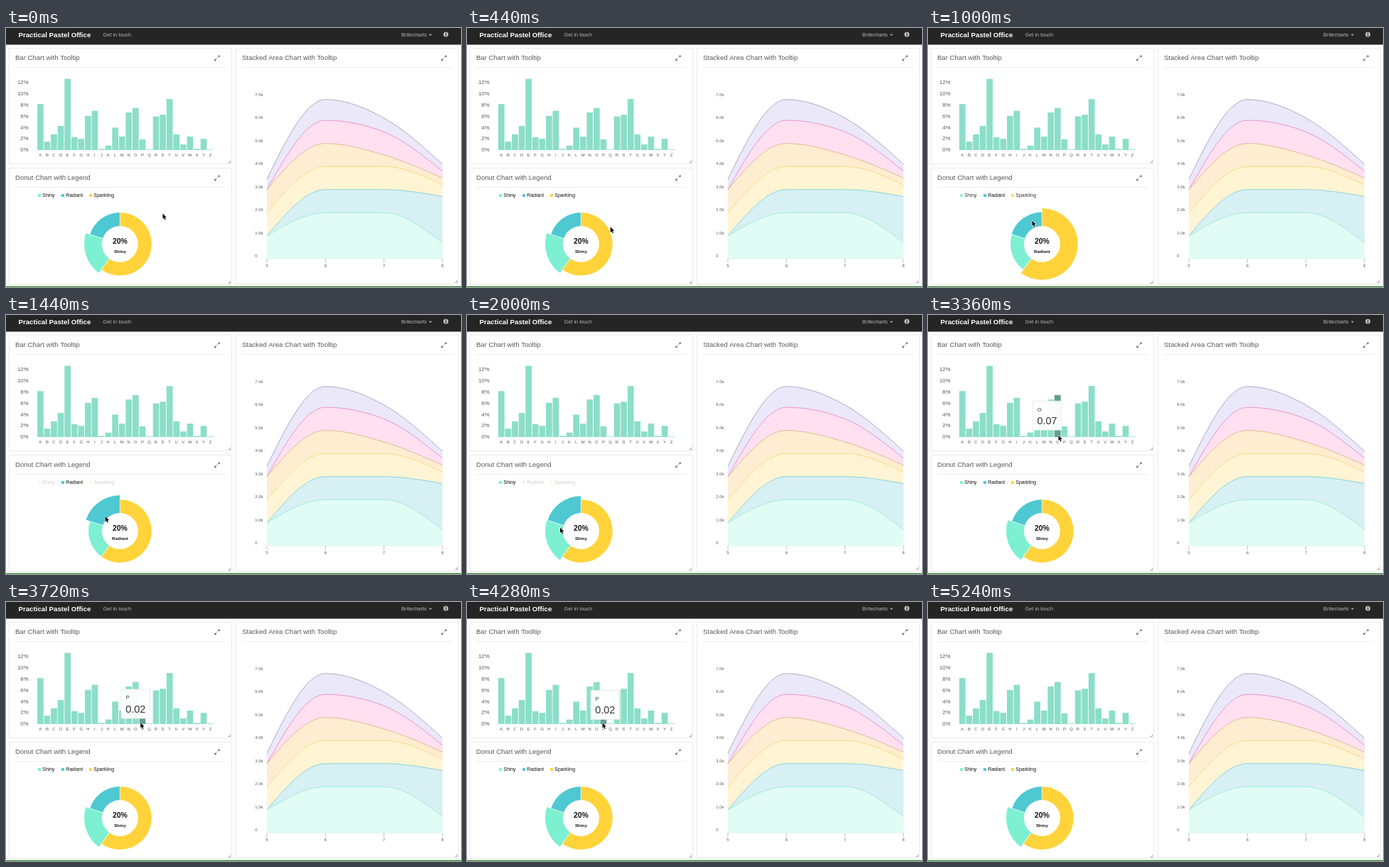
Write an HTML page with a canvas that moves like this. It is 640 by 365 pixels and loops after 5280 ms.

```html
<!DOCTYPE html>
<html lang="en">
<head>
<meta charset="utf-8">
<title>Chart dashboard</title>
<style>
html, body { margin: 0; width: 100%; height: 100%; overflow: hidden; background: #fff; }
canvas { display: block; width: 640px; height: 365px; }
</style>
</head>
<body>
<canvas id="stage"></canvas>
<script>
const LOOP = 5280, W = 640, H = 365;
const canvas = document.getElementById('stage');
const ctx = canvas.getContext('2d');
const dpr = window.devicePixelRatio || 1;
canvas.width = W * dpr;
canvas.height = H * dpr;

const FONT = '"Liberation Sans", Arial, sans-serif';
const INK = '#585858';

// English letter frequencies, A to Z, in percent
const FREQ = [8.2, 1.5, 2.8, 4.3, 12.7, 2.3, 2, 6.1, 7, .2, .8, 4, 2.4,
  6.7, 7.5, 1.9, .1, 6, 6.3, 9.1, 2.8, 1, 2.4, .2, 2, .1];
const BAR_X = 44, BAR_STEP = 9.57, BAR_BASE = 172, PER_CENT = 7.9;

// Stacked tops in thousands, back to front
const LAYERS = [
  { tops: [3.45, 6.9, 6.1, 4.1], fill: '#998ce3', line: '#9a90b0' },
  { tops: [3, 6, 5.5, 3.8], fill: '#f866b9', line: '#e07cbc' },
  { tops: [3, 5, 4.5, 3.5], fill: '#ffa71a', line: '#d8ab78' },
  { tops: [2, 4, 4, 3.2], fill: '#ffc624', line: '#f3d468' },
  { tops: [1, 3, 3, 2.7], fill: '#39b2c8', line: '#6acad3' },
  { tops: [1, 2, 2, .7], fill: '#6aedc7', line: '#84ead0' }
];
const AREA_X = 367, AREA_STEP = 82.3, AREA_BASE = 325.4, PER_K = 32.55;

const SLICES = [
  { name: 'Shiny', share: [.6, .8], color: '#7df0d2', legendX: 47 },
  { name: 'Radiant', share: [.8, 1], color: '#4ec8d1', legendX: 80 },
  { name: 'Sparkling', share: [0, .6], color: '#ffd339', legendX: 119 }
];

// Mouse route: time, x, y
const ROUTE = [[0, 220.5, 261.5], [480, 200, 282], [1000, 146.5, 271.5], [2000, 131, 299.5],
  [2300, 133, 292], [2680, 155.5, 170], [3360, 183.5, 169.5], [3800, 190.5, 170]];
const BARS_IN = 2720, MOUSE_OUT = 5000;

// Slice under the mouse; off the ring the chart falls back to Shiny
const HOVERS = [
  { from: -LOOP, name: 'Shiny', idle: true },
  { from: 450, name: 'Sparkling' },
  { from: 950, name: 'Radiant' },
  { from: 1720, name: 'Shiny' },
  { from: 2300, name: 'Radiant' },
  { from: 2400, name: 'Shiny', idle: true }
];
HOVERS.forEach((h, i) => { h.to = i + 1 < HOVERS.length ? HOVERS[i + 1].from : LOOP; });

const clamp = u => Math.max(0, Math.min(1, u));
const ease = u => { u = clamp(u); return u * u * (3 - 2 * u); };

function mouse(t) {
  const i = ROUTE.findIndex(p => p[0] > t);
  if (i < 0) return ROUTE[ROUTE.length - 1].slice(1);
  const [t0, x0, y0] = ROUTE[i - 1], [t1, x1, y1] = ROUTE[i];
  const u = (t - t0) / (t1 - t0);
  return [x0 + (x1 - x0) * u, y0 + (y1 - y0) * u];
}

// Grows on entry, shrinks a moment after leaving
function growth(name, t) {
  return Math.max(...HOVERS.map(h => h.name === name
    ? ease((t - h.from) / 250) * (1 - ease((t - h.to - 200) / 300)) : 0));
}

// y is the middle of the capitals
function text(str, x, y, size, color = INK, align = 'left', weight = 'normal') {
  ctx.font = `${weight} ${size}px ${FONT}`;
  ctx.textAlign = align;
  ctx.fillStyle = color;
  ctx.fillText(str, x, y + size * .36);
}

function rect(x, y, w, h, color) {
  ctx.fillStyle = color;
  ctx.fillRect(x, y, w, h);
}

function frame(x, y, w, h, color, width) {
  ctx.strokeStyle = color;
  ctx.lineWidth = width;
  ctx.strokeRect(x, y, w, h);
}

function dot(x, y, r, color) {
  ctx.beginPath();
  ctx.arc(x, y, r, 0, Math.PI * 2);
  ctx.fillStyle = color;
  ctx.fill();
}

function line(points, color, width) {
  ctx.beginPath();
  points.forEach(([x, y]) => ctx.lineTo(x, y));
  ctx.strokeStyle = color;
  ctx.lineWidth = width;
  ctx.stroke();
}

function poly(points, color) {
  ctx.beginPath();
  points.forEach(([x, y]) => ctx.lineTo(x, y));
  ctx.closePath();
  ctx.fillStyle = color;
  ctx.fill();
}

function expandIcon(x, y) {
  for (const s of [1, -1]) {
    line([[x + .7 * s, y - .7 * s], [x + 2.6 * s, y - 2.6 * s]], '#444', .9);
    poly([[x + 3.6 * s, y - 3.6 * s], [x + s, y - 3.6 * s], [x + 3.6 * s, y - s]], '#444');
  }
}

function card(x, y, w, h, title) {
  const r = x + w - 2.5, b = y + h - 2.5;
  rect(x, y, w, h, '#fff');
  frame(x + .5, y + .5, w - 1, h - 1, '#ebebeb', 1);
  text(title, x + 9, y + 14, 9.55);
  expandIcon(x + w - 21, y + 14.3);
  rect(x + 9, y + 27, w - 18, 1, '#eee');
  line([[r - 3, b], [r, b], [r, b - 3]], '#888', .8);
}

function navbar() {
  const grey = '#b4b4b4', dark = '#252525';
  rect(0, 0, W, 23.5, dark);
  text('Practical Pastel Office', 17.5, 9.5, 9.7, '#fff', 'left', 'bold');
  text('Get in touch', 136.5, 9.5, 7.35, grey);
  text('Britecharts', 556, 9.5, 7.5, grey);
  poly([[594.8, 8.7], [599.2, 8.7], [597, 11]], grey);
  dot(618.7, 9, 3.5, '#c0c0c0');
  rect(618.1, 6.6, 1.3, 1.2, dark);
  rect(618.1, 8.5, 1.3, 2.8, dark);
}

const letter = i => String.fromCharCode(65 + i);

function barChart(active) {
  for (let p = 0; p <= 12; p += 2) text(p + '%', 31.6, 171.3 - p * PER_CENT, 7.8, INK, 'right');
  FREQ.forEach((f, i) => {
    const h = f * PER_CENT, x = BAR_X + i * BAR_STEP;
    rect(x, BAR_BASE - h, 8.7, h, i === active ? '#629d90' : '#8bdec8');
    text(letter(i), x + 4.3, 178.8, 5.9, INK, 'center');
  });
}

// Trails the mouse by about half a second
function tooltip(t, active) {
  const x = mouse(t - 480)[0] - 16.5, y = 102 + x * .13;
  rect(x, y, 40.5, 41, 'rgba(255,255,255,.95)');
  frame(x, y, 40.5, 41, '#e4e8e7', .8);
  text(letter(active), x + 6.5, y + 11.5, 8, '#444');
  text((FREQ[active] / 100).toFixed(2), x + 6.3, y + 27.5, 14.4, '#333');
}

function donut(t) {
  const cx = 160.4, cy = 304.5;
  const hover = HOVERS.find(h => t < h.to);
  const dim = hover.idle ? 1 : 1 - .8 * clamp((t - hover.from) / 250);
  for (const s of SLICES) {
    ctx.globalAlpha = s.name === hover.name ? 1 : dim;
    dot(s.legendX, 236, 2.3, s.color);
    text(s.name, s.legendX + 4.3, 236, 6.9, '#111');
    ctx.globalAlpha = 1;

    const [a, b] = s.share.map(v => (v - .25) * Math.PI * 2);
    ctx.beginPath();
    ctx.arc(cx, cy, 44.7 + 6 * growth(s.name, t), a, b);
    ctx.arc(cx, cy, 25.2, b, a, true);
    ctx.closePath();
    ctx.fillStyle = s.color;
    ctx.fill();
    ctx.strokeStyle = '#fff';
    ctx.lineWidth = .6;
    ctx.stroke();
    if (s.name === hover.name) {
      const share = Math.round((s.share[1] - s.share[0]) * 100) + '%';
      text(share, cx, 300, 10.4, '#111', 'center', 'bold');
      text(s.name, cx, 315, 6.2, '#111', 'center', 'bold');
    }
  }
}

// Monotone cubic through evenly spaced tops
function curve(tops) {
  const p = tops.map((v, i) => [AREA_X + i * AREA_STEP, AREA_BASE - v * PER_K]);
  const d = [0, 1, 2].map(i => p[i + 1][1] - p[i][1]);
  const inner = (a, b) => a * b <= 0 ? 0
    : Math.sign(a) * 2 * Math.min(Math.abs(a), Math.abs(b), Math.abs(a + b) / 4);
  const m1 = inner(d[0], d[1]), m2 = inner(d[1], d[2]);
  const m = [(3 * d[0] - m1) / 2, m1, m2, (3 * d[2] - m2) / 2];
  const path = new Path2D();
  path.moveTo(...p[0]);
  for (let i = 0; i < 3; i++) {
    path.bezierCurveTo(p[i][0] + AREA_STEP / 3, p[i][1] + m[i] / 3,
      p[i + 1][0] - AREA_STEP / 3, p[i + 1][1] - m[i + 1] / 3, ...p[i + 1]);
  }
  return path;
}
LAYERS.forEach(l => {
  l.path = curve(l.tops);
  l.area = new Path2D(l.path);
  l.area.lineTo(AREA_X + 3 * AREA_STEP, AREA_BASE);
  l.area.lineTo(AREA_X, AREA_BASE);
  l.area.closePath();
});

function areaChart() {
  for (let k = 0; k < 8; k++) {
    text(k ? k + '.0k' : '0', 350.3, 321.3 - k * 32.5, 5.9);
  }
  for (const l of LAYERS) {
    ctx.fillStyle = '#fff';
    ctx.fill(l.area);
    ctx.globalAlpha = .2;
    ctx.fillStyle = l.fill;
    ctx.fill(l.area);
    ctx.globalAlpha = 1;
  }
  ctx.lineWidth = .75;
  for (const l of LAYERS) {
    ctx.strokeStyle = l.line;
    ctx.stroke(l.path);
  }
  for (let i = 0; i < 4; i++) {
    const x = AREA_X + i * AREA_STEP;
    line([[x, AREA_BASE], [x, 331]], '#aaa', .7);
    text(String(5 + i), x, 335.3, 5.9, INK, 'center');
  }
}

function pointer(x, y) {
  const shape = [[0, 0], [0, 7.6], [1.7, 6.1], [2.9, 8.9], [4.2, 8.3], [3, 5.6], [5.3, 5.5]]
    .map(([a, b]) => [x + a, y + b]);
  line([...shape, shape[0]], '#fff', 1.2);
  poly(shape, '#000');
}

function draw(t) {
  ctx.setTransform(dpr, 0, 0, dpr, 0, 0);
  rect(0, 0, W, H, '#fdfdfd');
  navbar();
  card(4, 28, 314, 164, 'Bar Chart with Tooltip');
  card(4, 197, 314, 165, 'Donut Chart with Legend');
  card(323, 28, 314, 333, 'Stacked Area Chart with Tooltip');
  rect(0, 364, W, 1, '#0c820c');

  const [x, y] = mouse(t);
  const inBars = t > BARS_IN && t < MOUSE_OUT;
  const active = inBars ? Math.floor((x - BAR_X) / BAR_STEP) : -1;
  barChart(active);
  donut(t);
  areaChart();
  if (inBars) tooltip(t, active);
  if (t < MOUSE_OUT) pointer(x, y);
}

let start = null;
function tick(now) {
  if (start === null) start = now;
  draw((now - start) % LOOP);
  requestAnimationFrame(tick);
}
draw(0);
requestAnimationFrame(tick);
</script>
</body>
</html>
```
